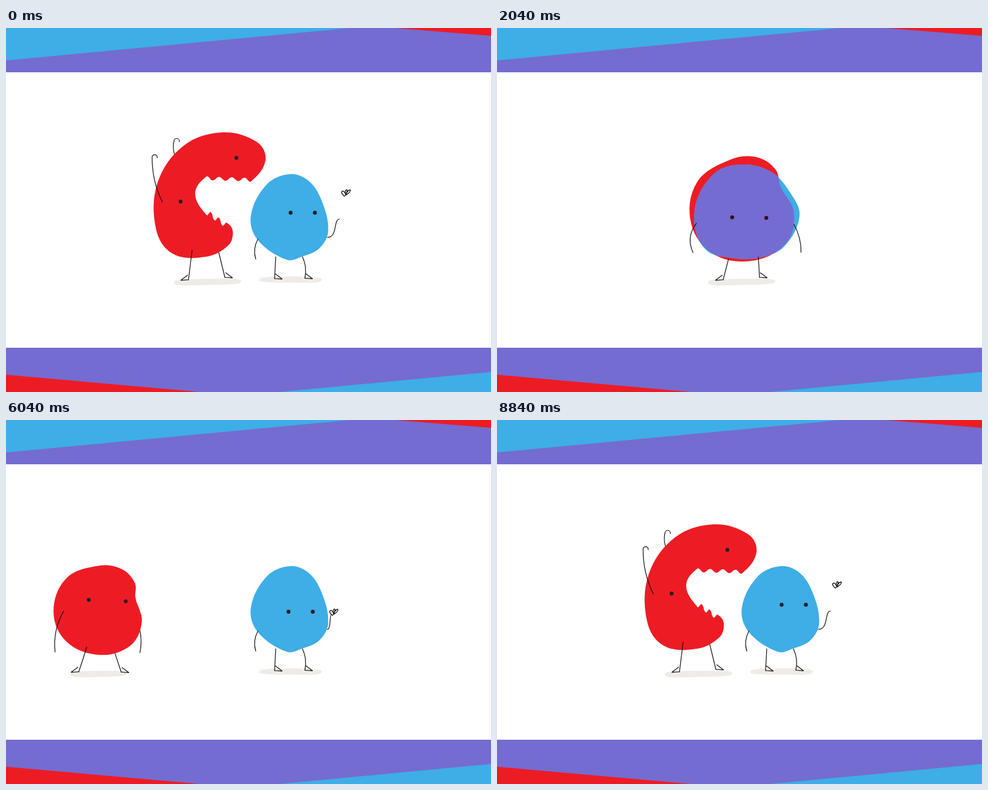
Animation, 800 px wide and 600 px high, one loop 8.88 s. Source, as an HTML page with a canvas:

```html
<!DOCTYPE html>
<html lang="en">
<head>
<meta charset="utf-8">
<title>Two blobs</title>
<style>
html, body { margin: 0; width: 100%; height: 100%; overflow: hidden; background: #fff; }
canvas { display: block; width: 800px; height: 600px; }
</style>
</head>
<body>
<canvas id="stage" width="800" height="600"></canvas>
<script>
const ctx = document.getElementById('stage').getContext('2d');
const LOOP = 8880, STEP = 40, CUT = 2800, EATEN = 440, TAU = Math.PI * 2;
const RED = '#ed1c24', BLUE = '#3fade6', PURPLE = '#746cd0', INK = '#111', SHADE = '#efece7';

const mix = (a, b, k) => a.map((v, i) => v + (b[i] - v) * k);
const smooth = k => { k = Math.max(0, Math.min(1, k)); return k * k * (3 - 2 * k); };
const ramp = (t, a, b) => smooth((t - a) / (b - a));
const move = (pts, dx, dy) => pts.map((v, i) => v + (i % 2 ? dy : dx));

// Red outlines around the body centre, clockwise from the lower lip to the upper lip.
const SHUT = [61.5,-22, 73,17, 55.5,56.5, 5.5,73.5, -49.5,54, -73,5, -53.5,-51, 0.5,-73.5, 37.5,-69, 59.5,-47];
const AJAR = [50.5,21.5, 43.5,44.5, 6.5,63.5, -48.5,58.5, -76,18, -73.5,-58.5, -30.5,-119.5, 33.5,-141.5, 90.5,-125.5, 104.5,-95.5];

function teeth() {
  const out = [];
  for (let i = 0; i < 8; i++) out.push(80.5 - 10.5 * i, -63.5 - 0.3 * i + 3 * (-1) ** i);
  out.push(-11.5, -40.5);
  for (let i = 0; i < 6; i++) out.push(7.5 + 6.6 * i, -9.5 + 4.3 * i + 4.5 * (-1) ** i);
  return out;
}
const open = AJAR.concat(teeth());
const closed = SHUT.slice();
for (let n = (open.length - SHUT.length) / 2, i = 1; i <= n; i++)
  closed.push(...mix(SHUT.slice(-2), SHUT.slice(0, 2), i / (n + 1)));

const BLUE_BODY = [467,241, 498,251, 520,283, 531.5,334, 517,363, 489,376.5, 463,382, 415,349, 404,309, 430,258];
const BLUE_EATEN = [405,225, 452,237, 484,272, 499,310, 474,360, 436,378, 395,380, 342,363, 326,300, 358,240];

// Attachment points on red: eyes, shoulders, hips.
const SPOTS = [-15.5,-16.5, 45.5,-16, -56.5,3.5, 55,0, -16.5,61, 30.5,70.5];
const SPOTS_OPEN = [-35.5,-27.5, 56.5,-99.5, -65.5,-26.5, -45.5,-105, -16.5,52.5, 27.5,56.5];
const SPOTS_WHOLE = [-14.2,7.2, 33,17.6, -65.6,5.5, 69.5,34.5, -31,64, 11,69.5];

// body: x, y, turn, size, jaw, whole; arms: reach x, y, bend; shade: centre, half width
const stand = {
  body: [149.5, 313, 0, 1, 0, 0], armL: [-14, 67, 11], armR: [14.5, 68.5, -15],
  footL: [120, 415], footR: [190, 415.5, 0], shade: [153.5, 46.5]
};
const reach = { ...stand, armL: [-43, -16, 0] };
const scratch = { ...stand, armL: [15, -47, -28] };
const glance = { ...stand, body: [151.5, 313.5, 0.03, 1, 0, 0] };
const lean = {
  body: [124, 317, -0.4, 1, 0, 0], armL: [-8, 48, 32], armR: [37, 25, -40],
  footL: [120, 415], footR: [337, 405, -1.01], shade: [145, 56.5]
};
const wind = { ...lean, footR: [215, 398, -1] };
const plant = { ...lean, footR: [361, 411, 0] };
const arrive = {
  body: [323.5, 314, 0, 1, 0, 0], armL: [0, 58, 20], armR: [17.5, 60.5, -3],
  footL: [301, 415], footR: [361, 411, 0], shade: [332.5, 58]
};
const roar = { ...arrive, body: [323.5, 313.5, 0, 1, 1, 0], armL: [-17, -74, -9], armR: [-1, -22, -3], shade: [332.5, 55.5] };
const wide = { ...roar, body: [325, 290, 0, 1, 1.12, 0] };
const lunge = { ...roar, body: [388, 297, 0.05, 1, 1.04, 0], footL: [364, 402], footR: [425, 398, 0], shade: [397, 55] };
const whole = {
  body: [402.5, 300.5, -0.2, 1.163, 0, 1], armL: [-7, 49, 15], armR: [10, 47, -6],
  footL: [373, 415], footR: [433, 411, 0], shade: [403.5, 55.5]
};
const squat = { ...whole, body: [402.5, 307, -0.2, 1.163, 0, 1] };
const perk = { ...whole, armL: [-2, 46, 14], armR: [17, 43, -8] };

const keys = [[0, roar], [200, wide], [400, lunge], [600, whole], [760, squat], [960, whole],
  [1220, whole], [1480, squat], [1720, whole], [1960, whole], [2200, perk], [2480, perk],
  [CUT - STEP, whole], [CUT, stand], [3720, stand], [3880, reach], [4040, scratch],
  [5120, scratch], [5260, reach], [5420, stand], [5600, stand], [5840, glance], [6200, glance],
  [6440, stand], [6520, stand], [6740, wind], [6960, lean], [7040, lean], [7140, plant],
  [7520, arrive], [8340, arrive], [8620, roar], [LOOP, roar]];

function poseAt(t) {
  const i = keys.findIndex(k => k[0] > t), [ta, a] = keys[i - 1], [tb, b] = keys[i];
  const k = ramp(t, ta, tb), out = {};
  for (const name in a) out[name] = mix(a[name], b[name], k);
  return out;
}

function place(pts, [x, y, turn, size]) {
  const c = Math.cos(turn) * size, s = Math.sin(turn) * size;
  return pts.map((v, i) => i % 2 ? y + pts[i - 1] * s + v * c : x + v * c - pts[i + 1] * s);
}

// Closed smooth curve through the points.
function blob(pts) {
  const n = pts.length / 2, path = new Path2D();
  const at = i => { i = (i + n) % n; return [pts[2 * i], pts[2 * i + 1]]; };
  const dir = i => {
    const [ax, ay] = at(i - 1), [bx, by] = at(i + 1), d = Math.hypot(bx - ax, by - ay) || 1;
    return [(bx - ax) / d, (by - ay) / d];
  };
  path.moveTo(...at(0));
  for (let i = 0; i < n; i++) {
    const a = at(i), b = at(i + 1), u = dir(i), v = dir(i + 1);
    const h = Math.hypot(b[0] - a[0], b[1] - a[1]) * 0.35;
    path.bezierCurveTo(a[0] + u[0] * h, a[1] + u[1] * h, b[0] - v[0] * h, b[1] - v[1] * h, ...b);
  }
  path.closePath();
  return path;
}

function fill(path, color) { ctx.fillStyle = color; ctx.fill(path); }

function poly(color, ...p) {
  ctx.fillStyle = color;
  ctx.beginPath();
  for (let i = 0; i < p.length; i += 2) ctx.lineTo(p[i], p[i + 1]);
  ctx.fill();
}

// Arc from a to b pushed sideways by bend, with an optional curl at the tip.
function limb([ax, ay], [bx, by], bend = 0, curl = 0) {
  const dx = bx - ax, dy = by - ay, d = Math.hypot(dx, dy) || 1;
  ctx.beginPath();
  ctx.moveTo(ax, ay);
  ctx.quadraticCurveTo((ax + bx) / 2 - dy / d * bend, (ay + by) / 2 + dx / d * bend, bx, by);
  if (curl > 0) ctx.arc(bx + curl, by, curl, Math.PI, TAU + 0.2);
  ctx.stroke();
}

function arm(from, [dx, dy, bend], curl) {
  limb(from, [from[0] + dx, from[1] + dy], bend, curl);
}

function leg(hip, foot, side, bend) {
  limb(hip, foot, bend);
  ctx.save();
  ctx.translate(foot[0], foot[1]);
  ctx.rotate(foot[2] || 0);
  ctx.scale(side, 1);
  ctx.beginPath();
  ctx.moveTo(0, 0);
  ctx.lineTo(12.5, 0.8);
  ctx.lineTo(1.5, -7.5);
  ctx.stroke();
  ctx.restore();
}

function eye(x, y, color) {
  ctx.fillStyle = color;
  ctx.beginPath();
  ctx.arc(x, y, 3.2, 0, TAU);
  ctx.fill();
}

function shadow(x, y, r, tilt) {
  fill(blob([x - r * 0.85, y - 4, x, y - 5.5, x + r * 0.88, y - 5 + tilt, x + r, y - 1 + tilt,
    x + r * 0.8, y + 3 + tilt, x, y + 4.5, x - r * 0.85, y + 5 - tilt, x - r, y + 0.5]), SHADE);
}

function bands() {
  poly(PURPLE, 0,0, 800,0, 800,73, 0,73);
  poly(PURPLE, 0,527, 800,527, 800,600, 0,600);
  poly(BLUE, 0,0, 568,0, 0,53.5);
  poly(RED, 642,0, 800,0, 800,13);
  poly(RED, 0,571.5, 320,600, 0,600);
  poly(BLUE, 450,600, 800,567, 800,600);
}

function butterfly(x, y, flap) {
  ctx.save();
  ctx.translate(x, y);
  ctx.scale(flap, 1);
  ctx.lineWidth = 1.4;
  ctx.beginPath();
  ctx.moveTo(-3, 6);
  ctx.bezierCurveTo(-7, 3, -9, -1, -6, -2);
  ctx.quadraticCurveTo(-3, -3, -1, 3);
  ctx.quadraticCurveTo(-2, -4, 1, -4.5);
  ctx.quadraticCurveTo(3, -4, 0, 3);
  ctx.bezierCurveTo(2, -3, 5, -4, 7, -4);
  ctx.quadraticCurveTo(8, 0, -3, 6);
  ctx.stroke();
  ctx.restore();
}

function flyer(t, hand, up) {
  if (t < CUT) {
    const x = 561 - 0.0258 * t + 0.0001167 * t * t;
    const y = 271 - 60 * ramp(t, 0, 1200) + 2 * Math.sin(t * TAU / 600);
    if (x < 812) butterfly(x, y, 0.9 + 0.1 * Math.cos(t * TAU / 240));
  } else {
    const flap = 0.85 + 0.1 * Math.cos((t - 8080) * TAU / 520);
    const [x, y] = mix([hand[0] + 4, hand[1] - 4], [561, 271], up);
    butterfly(x, y, flap + (1 - flap) * up);
  }
}

function bubbles(t) {
  if (t < 1000 || t > 1440) return;
  const grow = ramp(t, 1000, 1160) * (1 - ramp(t, 1320, 1440));
  const drift = 8 * (1 - ramp(t, 1000, 1200)), rise = (t - 1200) / 200;
  ctx.lineWidth = 1.3;
  for (const [x, y, r] of [[300.5, 330.5 - 8 * rise, 4], [299, 353.5 - 3 * rise, 5]]) {
    ctx.beginPath();
    ctx.arc(x + drift, y, r * grow, 0, TAU);
    ctx.stroke();
  }
  if (t < 1120 || t > 1300) return;
  ctx.beginPath();
  for (let i = 0; i < 3; i++) {
    const a = 1.72 + 0.75 * i, d = 11 + 3 * i;
    for (const [r, op] of [[d, 'moveTo'], [d + 4.5, 'lineTo']])
      ctx[op](299 + Math.cos(a) * r, 353.5 + Math.sin(a) * r);
  }
  ctx.stroke();
}

function draw(t) {
  ctx.fillStyle = '#fff';
  ctx.fillRect(0, 0, 800, 600);
  bands();
  ctx.strokeStyle = INK;
  ctx.lineWidth = 1.2;
  ctx.lineCap = ctx.lineJoin = 'round';

  const p = poseAt(t), [, y, turn, , jaw, join] = p.body;
  const alone = t < EATEN || t >= CUT;
  const up = t < CUT ? 1 : ramp(t, 8340, 8640);
  const near = ramp(t, 4320, 4520) * (1 - ramp(t, 6480, 6720));
  const hand = mix([547 - 10 * near, 320], [550, 315], up);
  p.armL[1] += 5 * Math.sin((t - 4640) * TAU / 300) * ramp(t, 4040, 4200) * (1 - ramp(t, 5000, 5120));

  const spots = place(mix(mix(SPOTS, SPOTS_OPEN, jaw), SPOTS_WHOLE, join), p.body);
  const spot = i => [spots[2 * i], spots[2 * i + 1]];

  shadow(p.shade[0], 419, p.shade[1], 0);
  if (alone) {
    shadow(469.5, 415, 51.5, 1.5);
    const w = hand[0] - 530;
    ctx.beginPath();
    ctx.moveTo(530, 345);
    ctx.bezierCurveTo(530 + w * 0.85, 346, 530 + w * 0.5, hand[1], ...hand);
    ctx.stroke();
  }
  if (join < 0.5) arm(spot(3), p.armR, 4.5 * jaw);

  const shape = jaw > 0.01 ? mix(closed, open, jaw) : SHUT;
  const gulp = t < CUT ? ramp(t, 300, 600) : 0;
  const red = blob(place(shape, p.body));
  const blue = blob(mix(BLUE_BODY, move(BLUE_EATEN, 0, y - whole.body[1]), gulp));
  fill(red, RED);
  fill(blue, BLUE);
  ctx.save();
  ctx.clip(red);
  fill(blue, PURPLE);
  ctx.restore();

  arm(spot(2), p.armL, 4.2 * jaw);
  if (join >= 0.5) arm(spot(3), p.armR);
  leg(spot(4), p.footL, -1, -16 * turn * (1 - join));
  leg(spot(5), p.footR, 1);
  for (const i of [0, 1]) eye(...spot(i), join > 0.5 ? '#3a0d14' : '#231f20');
  if (alone) {
    limb([415.5, 348], [412, 381], 7);
    leg([445, 377], [443, 413], 1);
    leg([489, 377], [493, 412.5], 1, -6);
    for (const x of [466, 506]) eye(x + 3.5 * up, 316 - 11.5 * up, '#231f20');
  }
  flyer(t, hand, up);
  bubbles(t);
}

function tick(now) {
  draw(Math.floor(now % LOOP / STEP) * STEP);
  requestAnimationFrame(tick);
}
draw(0);
requestAnimationFrame(tick);
</script>
</body>
</html>
```
